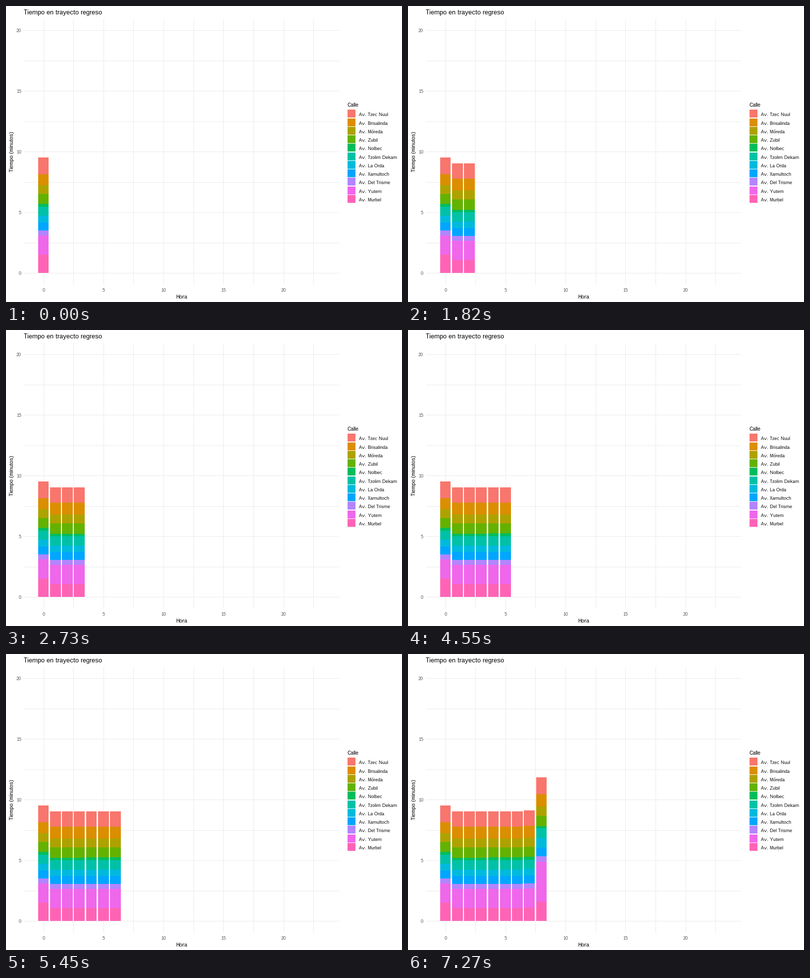
A matplotlib script that plays this animation: 800 by 600 pixels, repeating every 8 s.

```python
import math

import matplotlib.pyplot as plt
from matplotlib.animation import FuncAnimation
from matplotlib.patches import Rectangle

plt.rcParams["font.family"] = "Liberation Sans"
plt.rcParams["text.hinting"] = "native"
plt.rcParams["text.hinting_factor"] = 1

W, H, DPI = 800, 600, 100
LOOP, STEP = 8000, 50
CHANGES = [910, 1820, 2730, 3640, 4550, 5450, 6360, 7270]

# Plot scale in pixels
X0, X_UNIT = 76.0, 24.26
Y0, Y_UNIT = 541.9, 24.6
LEFT, RIGHT, TOP, BOTTOM = 36, 673, 27, 565
BASE = 541

GRID, TICK = "#EBEBEB", "#4D4D4D"
STREETS = [
    ("Tzec Nuul", "#F8766D"),
    ("Brisalinda", "#DB8E00"),
    ("Móreda", "#AEA200"),
    ("Zubil", "#64B200"),
    ("Nolbec", "#00BD5C"),
    ("Tzolim Dekam", "#00C1A7"),
    ("La Orda", "#00BADE"),
    ("Xamultoch", "#00A6FF"),
    ("Del Trisme", "#B385FF"),
    ("Yutem", "#EF67EB"),
    ("Murbel", "#FF63B6"),
]

# Upper edge of each segment, from the top of the bar down
MIDNIGHT = [307, 341, 363, 381, 401, 407, 425, 439, 455, 465, 504]
NIGHT = [319, 350, 374, 392, 413, 418, 437, 450, 466, 476, 515]
DAWN = NIGHT[:4] + [412] + NIGHT[5:]
SEVEN = [317, 348, 372, 391, 411, 417, 435, 449, 465, 475, 514]
EIGHT = [250, 284, 309, 328, 349, 353, 373, 393, 410, 421, 502]
HOURS = [MIDNIGHT] + [NIGHT] * 3 + [DAWN] * 3 + [SEVEN, EIGHT]

fig = plt.figure(figsize=(W / DPI, H / DPI), dpi=DPI, facecolor="white")
ax = fig.add_axes([0, 0, 1, 1])
ax.set_xlim(0, W)
ax.set_ylim(H, 0)
ax.axis("off")


def box(x0, y0, x1, y1, color, z=1):
    patch = Rectangle((x0, y0), x1 - x0, y1 - y0, facecolor=color,
                      edgecolor="none", linewidth=0, antialiased=False, zorder=z)
    return ax.add_patch(patch)


def label(x, y, text, px, color="black", ha="left", **kw):
    ax.text(x, y, text, fontsize=px * 72 / DPI, color=color, ha=ha,
            va="baseline", **kw)


def draw_grid():
    for i in range(10):
        x = math.floor(X0 + 2.5 * i * X_UNIT)
        box(x, TOP, x + 1, BOTTOM, GRID)
    for i in range(9):
        y = math.floor(Y0 - 2.5 * i * Y_UNIT)
        box(LEFT, y, RIGHT, y + 1, GRID)
    for v in range(0, 25, 5):
        x = math.floor(X0 + v * X_UNIT)
        y = math.floor(Y0 - v * Y_UNIT)
        label(x, 579, str(v), 9, TICK, "center")
        if v <= 20:
            label(31, y + 4, str(v), 9, TICK, "right")


def draw_titles():
    label(36, 17, "Tiempo en trayecto regreso", 13)
    label(354.5, 593, "Hora", 11, ha="center")
    label(15, 295, "Tiempo (minutos)", 11, ha="center",
          rotation=90, rotation_mode="anchor")


def draw_legend():
    label(690, 204, "Calle", 11)
    for i, (name, color) in enumerate(STREETS):
        y = math.floor(210.72 + 17.28 * i)
        box(690, y, 706, y + 16, color)
        label(713, y + 13, "Av. " + name, 9)


def draw_bar(hour, tops):
    mid = X0 + hour * X_UNIT
    x0 = math.floor(mid - 0.45 * X_UNIT)
    x1 = math.floor(mid + 0.45 * X_UNIT)
    edges = tops + [BASE]
    return [box(x0, edges[i], x1, edges[i + 1], color, z=2)
            for i, (_, color) in enumerate(STREETS)]


draw_grid()
# The scale ends before hour 25, so only 0 to 20 carry a tick label
draw_titles()
draw_legend()
bars = [draw_bar(h, tops) for h, tops in enumerate(HOURS)]


def update(frame):
    end = (frame + 1) * STEP
    last = sum(t < end for t in CHANGES)
    for hour, parts in enumerate(bars):
        for part in parts:
            part.set_visible(hour <= last)
    return [part for parts in bars for part in parts]


anim = FuncAnimation(fig, update, frames=LOOP // STEP, interval=STEP,
                     init_func=lambda: update(0), repeat=True,
                     repeat_delay=0, blit=False)
plt.show()
```
